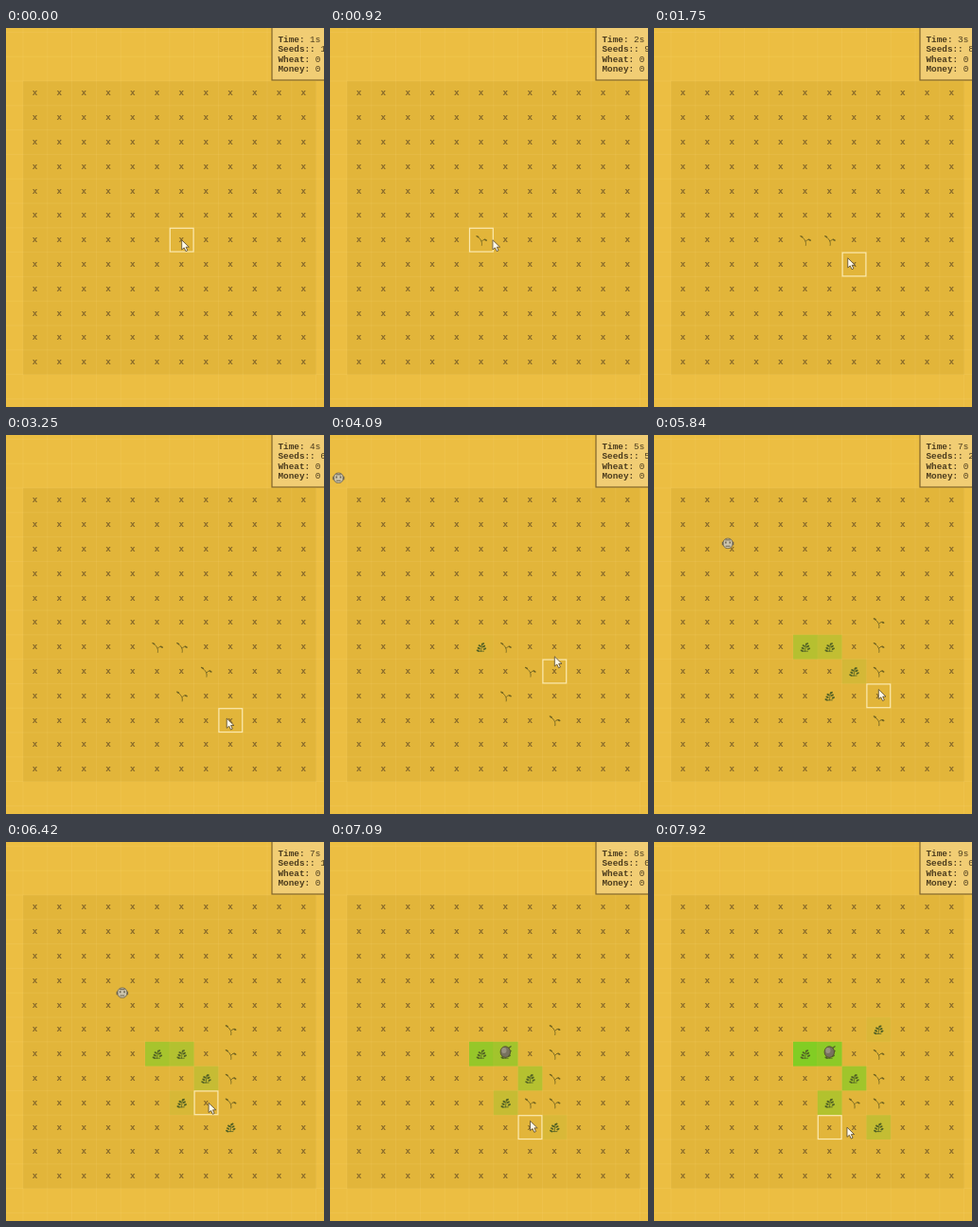
An HTML page for the animation above (8 s loop, 336x400 px).

```html
<!DOCTYPE html>
<html lang="en">
<head>
<meta charset="utf-8">
<title>Wheat field</title>
<style>
  html, body { margin: 0; width: 100%; height: 100%; overflow: hidden; background: #ecbe42; }
  svg { display: block; width: 336px; height: 400px; }
  text { font: 9.33px "Liberation Mono", "Courier New", monospace; fill: #4a3a1c; white-space: pre; }
  .label { font-weight: bold; }
  .mark { text-anchor: middle; fill: #84672a; font-weight: bold; }
</style>
</head>
<body>
<svg id="stage" viewBox="0 0 336 400">
  <defs>
    <g id="sprout" fill="#716422" stroke="#716422">
      <path d="M.4 6C1 3 .5 0-4-3.5M.5 1.5C2-.8 4-1 5.2.4" fill="none" stroke-width=".9"/>
      <ellipse cx="-4" cy="-3.6" rx="1.8" ry=".8" transform="rotate(30 -4 -3.6)" stroke="none"/>
      <ellipse cx="4.6" cy="0" rx="1.7" ry=".9" transform="rotate(25 4.6 0)" stroke="none"/>
    </g>
    <g id="bush" fill="#506025">
      <path d="M-.5 5C.5 2 0-1 1-4M-3 4.5H3" fill="none" stroke="#506025" stroke-width=".8"/>
    </g>
    <g id="bot" stroke="#6a6350">
      <path d="M-5.5-1.5V2M5.5-1.5V2" stroke-width="1.5"/>
      <rect x="-4.9" y="-5.2" width="9.8" height="10.4" rx="4.4" fill="#cdc5ae" stroke-width=".9"/>
      <path d="M-2.8-3.5H2.8M-2.4 2.9H2.4" stroke-width="1"/>
      <path d="M-2.2-1.8V.2M2.2-1.8V.2" stroke-width="1.5"/>
    </g>
    <g id="harvester">
      <path d="M2-3L6.2-6M4 1L6.2-1.5" stroke="#506025" stroke-width="1.2"/>
      <ellipse rx="5.2" ry="5.8" fill="#77715f" stroke="#55512f" stroke-width="1"/>
      <ellipse cx="-1.4" cy="-1.6" rx="2.6" ry="3" fill="#989181"/>
    </g>
  </defs>
  <rect width="336" height="400" fill="#ecbe42"/>
  <rect x="18" y="56" width="310" height="310" fill="#e2b53a"/>
  <path id="lines" fill="none" stroke="#ffe08a" stroke-opacity=".13"/>
  <g id="field"></g>
  <g id="plants"></g>
  <g id="robot"><use href="#bot" id="walking"/><use href="#harvester" id="working"/></g>
  <rect id="box" width="24.8" height="24.8" fill="none" stroke="#fbe9ae" stroke-width="1.2"/>
  <rect x="281" y="-3" width="70" height="58" fill="#f1cd74" stroke="#80642b" stroke-width="1.2"/>
  <g id="panel"></g>
  <path id="cursor" d="M0 0V10.2L2.5 8.2L4.3 12L6.1 11.1L4.4 7.5H7.7Z" fill="#fff8e8" stroke="#54462a" stroke-width=".8"/>
</svg>
<script>
const LOOP = 8000, CELL = 25.8, LEFT = 18, TOP = 56, SIZE = 12;
const TRAVEL = 400, SEEDS = 10, GROWN = 3100;
const $ = id => document.getElementById(id);
const clamp = v => Math.min(1, Math.max(0, v));
const smooth = u => u * u * (3 - 2 * u);
const cellX = col => LEFT + (col + 0.5) * CELL;
const cellY = row => TOP + (row + 0.5) * CELL;

function add(parent, tag, attrs, text = '') {
  const el = document.createElementNS('http://www.w3.org/2000/svg', tag);
  for (const name in attrs) el.setAttribute(name, attrs[name]);
  el.textContent = text;
  return parent.appendChild(el);
}
const move = (el, x, y) => el.setAttribute('transform', `translate(${x} ${y})`);
const show = (el, on) => el.style.display = on ? '' : 'none';

// Column, row and arrival time; every stop plants until the seeds run out.
const home = [6, 6, 0];
const stops = [
  [5, 6, 650], [6, 6, 1130], [7, 7, 1885], [6, 8, 2550], [8, 9, 3320],
  [8, 5, 4250], [8, 6, 4890], [8, 7, 5430], [8, 8, 5975], [7, 8, 6500],
  [7, 9, 7225], [6, 9, 7650], [7, 9, 8064]
];

function pointer(t) {
  const i = stops.findIndex(stop => stop[2] > t);
  const from = stops[i - 1] || home, to = stops[i];
  const k = smooth(clamp((t - to[2]) / TRAVEL + 1));
  return [0, 1].map(n => from[n] + (to[n] - from[n]) * k);
}

// Diagonal distance from the first cell: steady at first, then speeding up.
function robotDistance(t) {
  const s = (t - 4840) / 1000;
  return Math.min(6 * CELL, 28.7 * s + 18.8 * Math.max(s, 0) ** 2);
}

for (let i = 0; i < 6; i++) {
  const side = i % 2 ? 1 : -1, level = i >> 1;
  add($('bush'), 'ellipse', {
    rx: 1.8, ry: 1,
    transform: `translate(${side * (3.6 - level)} ${3 - level * 2.6 - side}) rotate(${-side * 30})`
  });
}

let lines = '';
for (let i = -2; i < 15; i++) lines += `M${LEFT + i * CELL} 0V400M0 ${TOP + i * CELL}H336`;
$('lines').setAttribute('d', lines);

const marks = [];
for (let row = 0; row < SIZE; row++)
  for (let col = 0; col < SIZE; col++)
    marks.push(add($('field'), 'text', { class: 'mark', x: cellX(col) - 0.3, y: cellY(row) + 2.5 }, 'x'));

const plants = stops.slice(0, SEEDS).map(([col, row, born]) => {
  const group = add($('plants'), 'g', {});
  move(group, cellX(col), cellY(row));
  return {
    group, born, mark: marks[row * SIZE + col],
    tile: add(group, 'rect', { x: -CELL / 2, y: -CELL / 2, width: CELL, height: CELL, fill: '#7fce24' }),
    sprout: add(group, 'use', { href: '#sprout' }),
    bush: add(group, 'use', { href: '#bush' })
  };
});

const [time, seeds] = ['Time:', 'Seeds::', 'Wheat:', 'Money:'].map((label, i) => {
  const line = add($('panel'), 'text', { x: 287.5, y: 15 + i * 10.3 });
  add(line, 'tspan', { class: 'label' }, label);
  return add(line, 'tspan', {}, ' 0');
});

function draw(t) {
  for (const { group, born, mark, tile, sprout, bush } of plants) {
    const age = t - born;
    show(group, age >= 0);
    show(mark, age < 0);
    show(sprout, age < GROWN);
    show(bush, age >= GROWN);
    tile.setAttribute('opacity', clamp((age - 3400) / 4000));
  }
  time.textContent = ` ${Math.floor(t / 1000 + 1.4)}s`;
  seeds.textContent = ` ${plants.filter(plant => plant.born > t).length}`;

  const distance = robotDistance(t), arrived = distance === 6 * CELL;
  move($('robot'), 30.5 + distance, 66.8 + distance);
  show($('walking'), !arrived);
  show($('working'), arrived);

  const [x, y] = pointer(t);
  move($('cursor'), cellX(x), cellY(y));
  const [col, row] = pointer(t - 60).map(Math.round);
  move($('box'), LEFT + col * CELL + 0.5, TOP + row * CELL + 0.5);
}

const start = performance.now();
function tick() {
  draw((performance.now() - start) % LOOP);
  requestAnimationFrame(tick);
}
tick();
</script>
</body>
</html>
```
